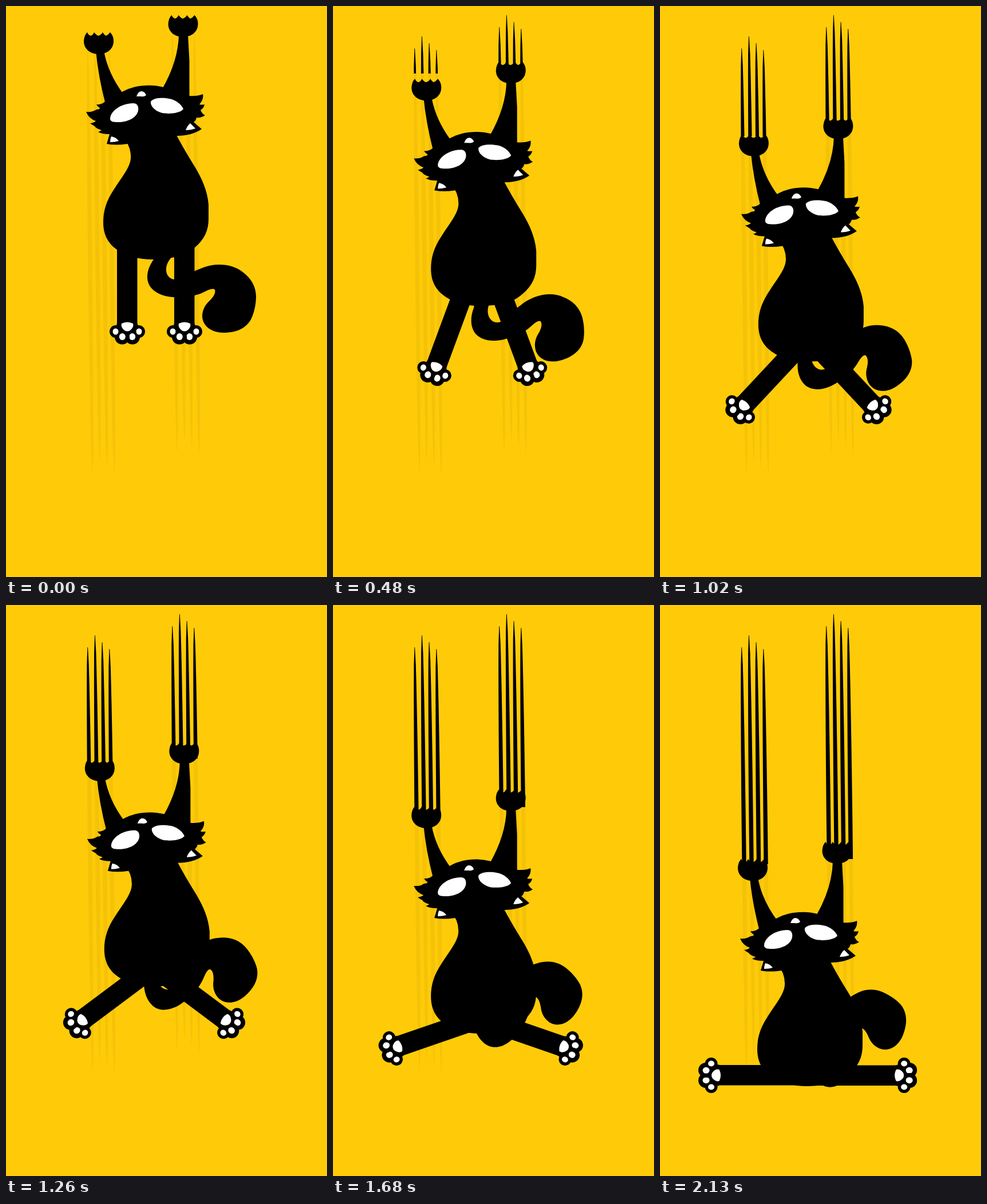
An HTML page for the animation above (3.93 s loop, 561x998 px).

```html
<!DOCTYPE html>
<html lang="en">
<head>
<meta charset="utf-8">
<title>Sliding cat</title>
<style>
  html, body { margin: 0; width: 100%; height: 100%; overflow: hidden; background: #ffcb08; }
  svg { display: block; width: 100%; height: 100%; }
  .white { fill: #fff; }
</style>
</head>
<body>
<svg viewBox="0 0 561 998">
  <defs>
    <clipPath id="leftClip"><rect width="240" height="0"/></clipPath>
    <clipPath id="rightClip"><rect x="240" width="240" height="0"/></clipPath>
    <path id="leftMarks"/>
    <path id="rightMarks"/>
    <path id="frontPaw" d="M136 61Q137 50 142 46Q144 51 148 52Q152 51 154 46Q158 51 161 52Q166 51 169 46
      Q172 51 175 52Q179 50 182 46Q188 52 188 61C188 76 176 84 162 84C148 84 136 76 136 61Z"/>
    <g id="sideToes">
      <circle cx="20" cy="145" r="11"/>
      <circle cx="9" cy="154.500" r="13"/>
      <g class="white">
        <ellipse cx="20.500" cy="145" rx="5" ry="5.500"/>
        <ellipse cx="8.700" cy="154" rx="5.500" ry="6"/>
      </g>
    </g>
    <!-- Hind leg hangs down from the hip at 0,0 -->
    <g id="leg">
      <path d="M-18-8H17.500V130L22 148H-22L-18 130Z"/>
      <use href="#sideToes"/>
      <use href="#sideToes" transform="scale(-1 1)"/>
      <path class="white" d="M-10 131Q0 126 10 131Q12 137 5 143Q0 146-5 143Q-12 137-10 131Z"/>
    </g>
  </defs>

  <g opacity=".045"><use href="#leftMarks"/><use href="#rightMarks"/></g>
  <use href="#leftMarks" clip-path="url(#leftClip)"/>
  <use href="#rightMarks" clip-path="url(#rightClip)"/>

  <g id="cat">
    <path id="tail" d="M268 425L258 443C247 458 244 475 250 487C258 503 280 510 300 509C318 510 337 505 348 499
      Q362 492 365 496C367 502 362 509 356 515C347 523 343 532 343 543C344 560 360 571 380 571
      C405 571 420 562 428 548C434 536 437 520 437 508C437 490 428 476 415 466C403 456 388 452 373 452
      C352 452 338 460 328 464C318 470 305 478 295 478C284 477 279 468 280 458C281 450 285 444 290 438V425Z"/>
    <use id="leftLeg" href="#leg"/>
    <use id="rightLeg" href="#leg"/>
    <use href="#frontPaw"/>
    <use href="#frontPaw" x="147.500" y="-30"/>
    <path d="M157 78Q161 122 174 172L206 155Q178 118 171 78Z"/>
    <path d="M302 50Q301 96 273 145L320.500 160V95L318 50Z"/>
    <!-- Body -->
    <path d="M205 230Q219 246 218 266C217 282 203 298 189 320C175 341 170 358 170 378C170 402 180 416 194 426
      C212 439 235 443 258 443C290 442 314 437 330 422C347 408 354 392 354 372V347C352 322 342 301 330 281Q310 249 297 224Z"/>
    <!-- Head and ears -->
    <path d="M203 150C228 136 262 135 290 147L320 157Q334 158 344 154Q346 163 338 172Q344 173 347 172
      Q346 178 340 182Q343 189 348 191Q341 196 333 195Q332 200 328 203L342 215Q325 227 297 227L212 241
      Q192 244 176 241L181 224Q167 224 161 220Q165 219 167 217Q157 214 155 210Q151 208 147 205
      Q154 204 157 201Q145 197 140 185Q151 186 158 181Q164 181 164 178Q160 176 158 172Q167 173 173 167Z"/>
    <g class="white">
      <path d="M182 197C182 184 201 170 222 170C230 170 232 176 231 183C228 196 212 203 196 203C187 203 182 202 182 197Z"/>
      <path d="M253 167C258 160 275 160 285 162C298 164 307 173 310 180C304 188 284 189 273 187C262 184 252 176 253 167Z"/>
      <path d="M228 158Q231 149 237 149Q243 150 245 156Q241 159 236 158Q231 158 228 158Z"/>
      <path d="M322 205Q317 209 314 217Q324 217 331 214Z"/>
      <path d="M184 228Q182 232 182 238Q190 238 197 236Q192 229 184 228Z"/>
    </g>
  </g>
</svg>
<script>
const LOOP = 3930, STEP = 30, SLIDE_STEPS = 71;
const $ = id => document.getElementById(id);

// One long claw mark, swelling in the middle and pointed at both ends
function mark(x, top, length) {
  const samples = 24, left = [], right = [];
  for (let i = 0; i <= samples; i++) {
    const p = i / samples;
    const halfWidth = .4 + 3.3 * Math.max(0, Math.sin(Math.PI * p)) ** .45;
    const centre = x + 8.5 * p, y = top + length * p;
    left.push(`${centre - halfWidth} ${y}`);
    right.unshift(`${centre + halfWidth} ${y}`);
  }
  return `M${left.concat(right).join('L')}Z`;
}

// Four marks of one paw; the second claw reaches highest
function drawMarks(id, x, top, length) {
  let path = '';
  for (let claw = 0; claw < 4; claw++) {
    const drop = claw ? 12 * (claw - 1) : 21;
    path += mark(x + 12.7 * claw, top + drop, length);
  }
  $(id).setAttribute('d', path);
}
drawMarks('leftMarks', 142.7, 53, 740);
drawMarks('rightMarks', 290.7, 16, 741);

const place = (id, x, y, rotation) =>
  $(id).setAttribute('transform', `translate(${x} ${y}) rotate(${rotation})`);
const reveal = (id, height) => $(id).firstElementChild.setAttribute('height', height);

// p runs from 0 (stretched out) to 1 (sitting in a split)
function pose(p) {
  const arc = Math.sin(Math.PI * p), swing = Math.sin(2.25 * p);
  const hipY = 424 - 3.5 * arc;
  place('cat', 1.9 * arc, 350 * p + 48 * p * p, 0);
  place('leftLeg', 212 + 29 * swing, hipY, 90 * p);
  place('rightLeg', 312 - 39 * swing, hipY, -90 * p);
  place('tail', 97 * p * p - 62 * p, 70 * p - 72 * p * p, `${-69 * p} 228 456`);
  reveal('leftClip', 20.6 + 432.4 * p);
  reveal('rightClip', 14.5 + 429.5 * p);
}

const start = performance.now();
function tick() {
  const time = (performance.now() - start) % LOOP;
  pose(Math.min(1, Math.floor(time / STEP) / SLIDE_STEPS));
  requestAnimationFrame(tick);
}
tick();
</script>
</body>
</html>
```
